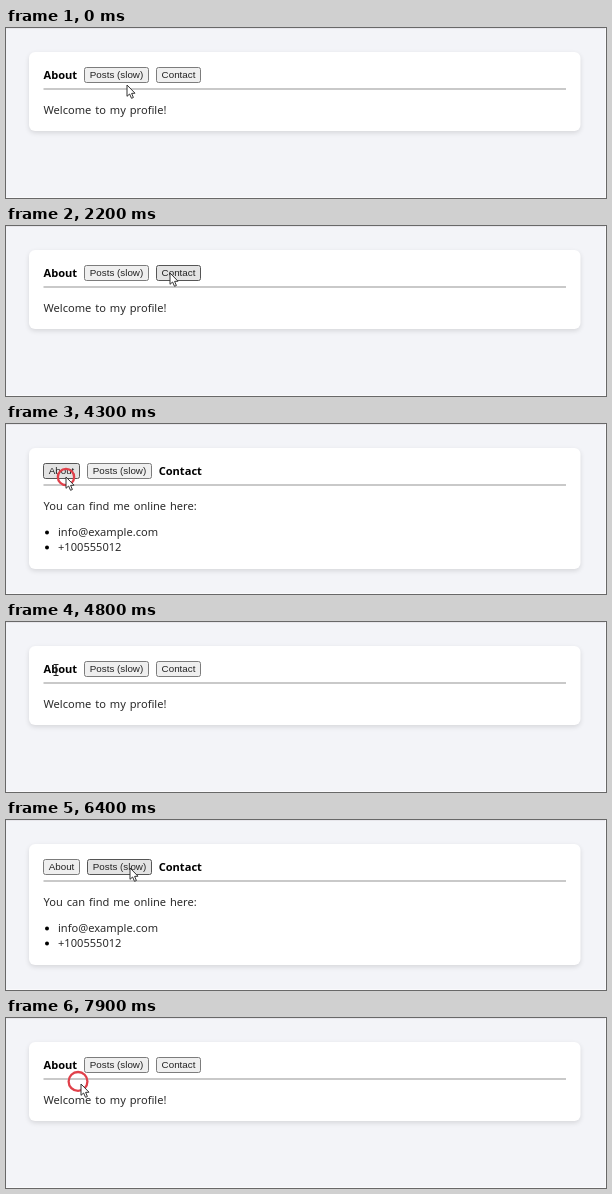
These frames come from a looping animation (600 by 170 pixels, 8000 ms). An HTML page with a canvas:

```html
<!DOCTYPE html>
<html lang="en">
<head>
<meta charset="utf-8">
<title>Profile tabs</title>
<style>
  html, body { margin: 0; width: 100%; height: 100%; overflow: hidden; background: #f3f4f8; }
  canvas { display: block; width: 600px; height: 170px; }
</style>
</head>
<body>
<canvas id="stage" width="600" height="170"></canvas>
<script>
const ctx = document.getElementById('stage').getContext('2d');
const LOOP = 8000, STEP = 100;
const BODY = '11.1px "Noto Sans", "Open Sans", sans-serif';
const BOLD = 'bold ' + BODY;
const LABEL = '9.8px "Liberation Sans", Arial, sans-serif';
const LEFT = 37.5, TAB_Y = 39.5, TAB_H = 15, GAP = 7.5, PAD = 5.3;

const TABS = ['About', 'Posts (slow)', 'Contact'];
const PAGES = {
  about: { active: 'About', intro: 'Welcome to my profile!', list: [] },
  contact: {
    active: 'Contact',
    intro: 'You can find me online here:',
    list: ['info@example.com', '+100555012']
  }
};

// Pointer: start time, duration, destination
const ABOUT = [60, 53], POSTS = [124, 48], CONTACT = [164, 47];
const HOME = [121, 57];
const MOVES = [
  [400, 200, [125, 64]],
  [800, 500, CONTACT],
  [1400, 400, POSTS],
  [1900, 300, CONTACT],
  [2400, 200, [162, 47]],
  [3200, 400, [118, 70]],
  [3900, 300, ABOUT],
  [4500, 300, [50, 48]],
  [4800, 300, POSTS],
  [5250, 450, CONTACT],
  [6000, 400, POSTS],
  [6600, 500, [75, 51]],
  [7200, 200, ABOUT],
  [7600, 280, [75, 66]]
];

// The slow tab never finishes loading, so its clicks open no page
const CLICKS = [
  [2750, 'contact'], [4215, 'about'], [5050],
  [5810, 'contact'], [6510], [7500, 'about']
];
const PULSE = 500, OPEN_DELAY = 150;

const smooth = k => k * k * (3 - 2 * k);

function pointerAt(t) {
  let [x, y] = HOME;
  for (const [start, duration, [toX, toY]] of MOVES) {
    if (t < start) break;
    const k = smooth(Math.min(1, (t - start) / duration));
    x += (toX - x) * k;
    y += (toY - y) * k;
  }
  return [x, y];
}

function pageAt(t) {
  const opened = CLICKS.filter(([at, page]) => page && t >= at + OPEN_DELAY).pop();
  return PAGES[opened ? opened[1] : 'about'];
}

function text(str, x, y, font, color, align = 'left') {
  ctx.font = font;
  ctx.fillStyle = color;
  ctx.textAlign = align;
  ctx.wordSpacing = font === BODY ? '1px' : '0px';
  ctx.fillText(str, x, y);
}

function textWidth(str, font) {
  ctx.font = font;
  ctx.wordSpacing = '0px';
  return ctx.measureText(str).width;
}

function stroke(color, width = 1) {
  ctx.lineWidth = width;
  ctx.strokeStyle = color;
  ctx.stroke();
}

function drawCard(height) {
  ctx.fillStyle = '#f3f4f8';
  ctx.fillRect(0, 0, 600, 170);
  ctx.fillStyle = '#e7e6eb';
  ctx.fillRect(0, 0, 600, 1);
  ctx.fillStyle = '#fafafc';
  ctx.fillRect(599, 0, 1, 170);
  ctx.fillRect(0, 169, 600, 1);
  ctx.save();
  ctx.shadowColor = 'rgba(0, 0, 0, 0.12)';
  ctx.shadowBlur = 5;
  ctx.shadowOffsetY = 2;
  ctx.fillStyle = '#fff';
  ctx.beginPath();
  ctx.roundRect(23, 24, 551.5, height, 6);
  ctx.fill();
  ctx.restore();
  ctx.fillStyle = '#939393';
  ctx.fillRect(LEFT, 60.5, 522.5, 1);
}

function drawButton(label, x, w, hover) {
  const left = Math.floor(x) + 0.5;
  const width = Math.round(w);
  ctx.beginPath();
  ctx.roundRect(left, TAB_Y, width, TAB_H, 2);
  ctx.fillStyle = hover ? '#e3e3e3' : '#efefef';
  ctx.fill();
  stroke(hover ? '#555' : '#7c7c7c');
  text(label, left + width / 2, 50, LABEL, '#222', 'center');
}

// Draws the tabs in a row; tells whether the pointer is over the bold one
function drawTabs(active, mx, my) {
  let x = LEFT, overActive = false;
  for (const label of TABS) {
    const isActive = label === active;
    const w = isActive ? textWidth(label, BOLD) : textWidth(label, LABEL) + 2 * PAD;
    const over = mx >= x && mx <= x + w && my >= TAB_Y && my <= TAB_Y + TAB_H;
    if (isActive) {
      text(label, x, 50.5, BOLD, '#000');
      overActive = over;
    } else {
      drawButton(label, x, w, over);
    }
    x += w + GAP;
  }
  return overActive;
}

function drawContent({ intro, list }) {
  text(intro, LEFT, 86, BODY, '#2b2b2b');
  list.forEach((item, i) => {
    const y = 112 + 15 * i;
    text(item, 52, y, BODY, '#2b2b2b');
    ctx.beginPath();
    ctx.arc(41, y - 3.5, 2, 0, 2 * Math.PI);
    ctx.fillStyle = '#000';
    ctx.fill();
  });
}

function drawArrow(x, y) {
  ctx.save();
  ctx.translate(x, y);
  ctx.fillStyle = '#fff';
  const shape = new Path2D('M0 0V11.3L2.6 9L4.5 13.3L6.4 12.5L4.6 8.4L8 8.2Z');
  ctx.fill(shape);
  ctx.lineWidth = 1;
  ctx.strokeStyle = '#333';
  ctx.stroke(shape);
  ctx.restore();
}

function drawBeam(x, y) {
  ctx.beginPath();
  for (const end of [y - 5.5, y + 5.5]) {
    ctx.moveTo(x - 2.5, end);
    ctx.lineTo(x + 2.5, end);
  }
  ctx.moveTo(x, y - 5.5);
  ctx.lineTo(x, y + 5.5);
  stroke('#222');
}

function drawRing(t) {
  const click = CLICKS.find(([at]) => t > at && t < at + PULSE);
  if (!click) return;
  // The ring trails the pointer by one step
  const [x, y] = pointerAt(t - STEP);
  ctx.beginPath();
  ctx.arc(x, y, 16 * Math.sin(Math.PI * (t - click[0]) / PULSE), 0, 2 * Math.PI);
  stroke('#e0404a', 2.3);
}

function draw(t) {
  const page = pageAt(t);
  const [x, y] = pointerAt(t);
  const items = page.list.length;
  drawCard(79 + (items && 12 + 15 * items));
  const overText = drawTabs(page.active, x, y);
  drawContent(page);
  drawRing(t);
  (overText ? drawBeam : drawArrow)(x, y);
}

const begin = performance.now();
function tick() {
  const t = (performance.now() - begin) % LOOP;
  draw(Math.floor(t / STEP) * STEP);
  requestAnimationFrame(tick);
}
tick();
</script>
</body>
</html>
```
